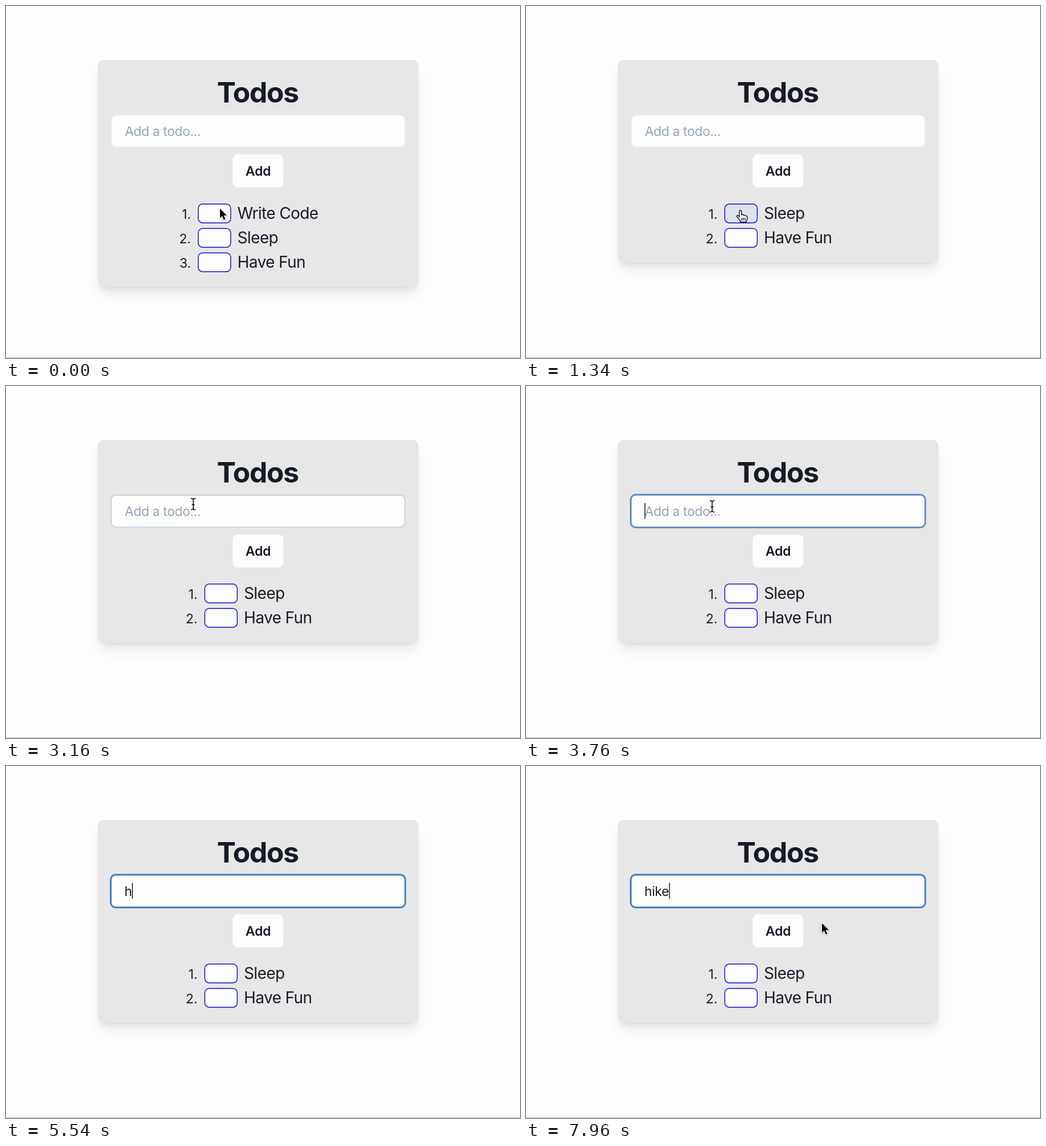
An HTML page with a canvas that plays this animation: 903 px wide and 620 px high, repeating every 8000 ms.

```html
<!DOCTYPE html>
<html lang="en">
<head>
<meta charset="utf-8">
<title>Todos</title>
<style>
  html, body { margin: 0; width: 100%; height: 100%; overflow: hidden; background: #fdfdfd; }
  canvas { display: block; width: 903px; height: 620px; }
</style>
</head>
<body>
<canvas id="stage"></canvas>
<script>
const W = 903, H = 620, LOOP = 8000;
const canvas = document.getElementById('stage');
const ctx = canvas.getContext('2d');
const dpr = window.devicePixelRatio || 1;
canvas.width = W * dpr;
canvas.height = H * dpr;

const PAPER = [253, 253, 253], HOVER = [221, 226, 236];
const EDGE = [226, 232, 240], EDGE_HOVER = [184, 198, 208], FOCUS = [50, 112, 178];
const INK = '#161b26', CARD = '#e7e7e7', BLUE = '#0b0bd0';
const FONT = 'Inter, "Open Sans", sans-serif';

// Event times in ms
const REMOVE = 1090, LEAVE = 2210, ENTER = 2320, CLICK = 3620;
const BLINK = 560;
const KEYS = [[5420, 'h'], [5840, 'i'], [6420, 'k'], [6680, 'e']];
const REAPPEAR = 7300;

// Pointer path: time, x, y
const PATH = [
  [0, 376, 357], [300, 377, 360], [2080, 377, 360], [2300, 342, 232],
  [2420, 340, 229], [2640, 340, 229], [3120, 329, 208], [3380, 329, 208],
  [3560, 327, 212], [REAPPEAR, 327, 212], [7560, 440, 228],
  [7760, 512, 258], [7940, 520, 277], [LOOP, 520, 277]
];

const clamp = v => Math.max(0, Math.min(1, v));
const ease = v => { v = clamp(v); return v * v * (3 - 2 * v); };
const fade = (t, start, len = 200) => ease((t - start) / len);
const mix = (a, b, k) => `rgb(${a.map((v, i) => Math.round(v + (b[i] - v) * k))})`;

function roundRect(x, y, w, h, r) {
  ctx.beginPath();
  ctx.roundRect(x, y, w, h, r);
}

function fillBox(x, y, w, h, r, color) {
  roundRect(x, y, w, h, r);
  ctx.fillStyle = color;
  ctx.fill();
}

function strokeBox(x, y, w, h, r, color, line) {
  roundRect(x + line / 2, y + line / 2, w - line, h - line, r - line / 2);
  ctx.strokeStyle = color;
  ctx.lineWidth = line;
  ctx.stroke();
}

function text(str, x, y, size, { weight = 400, color = INK, align = 'left', track = 0 } = {}) {
  ctx.font = `${weight} ${size}px ${FONT}`;
  ctx.letterSpacing = track + 'px';
  ctx.textAlign = align;
  ctx.fillStyle = color;
  ctx.fillText(str, x, y);
}

function shadow(x, y, w, h, dy, blur, inset, alpha) {
  ctx.save();
  ctx.shadowColor = `rgba(0,0,0,${alpha})`;
  ctx.shadowBlur = blur * dpr;
  ctx.shadowOffsetY = dy * dpr;
  fillBox(x + inset, y + inset, w - 2 * inset, h - 2 * inset, 8, CARD);
  ctx.restore();
}

function drawCard(height) {
  const box = [161, 95, 563.5, height];
  shadow(...box, 14.4, 21.6, 4.3, 0.1);
  shadow(...box, 5.8, 8.6, 2.9, 0.05);
  fillBox(...box, 10, CARD);
}

function drawInput(t) {
  const x = 184, y = 191.5, w = 517.5, h = 57.6;
  const focus = fade(t, CLICK);
  const edge = mix(EDGE, EDGE_HOVER, fade(t, ENTER));
  if (focus > 0) {
    ctx.globalAlpha = focus;
    strokeBox(x - 1.4, y - 1.4, w + 2.8, h + 2.8, 10, mix(FOCUS, FOCUS, 0), 2);
    ctx.globalAlpha = 1;
  }
  fillBox(x, y, w, h, 8.6, mix(PAPER, PAPER, 0));
  const parts = edge.match(/\d+/g).map(Number);
  strokeBox(x, y, w, h, 8.6, mix(parts, FOCUS, focus), 1.44);

  const typed = KEYS.filter(k => t >= k[0]);
  const value = typed.map(k => k[1]).join('');
  const style = { track: -0.4 };
  if (value) text(value, 208, 229, 23, style);
  else text('Add a todo...', 208.5, 229, 23, { ...style, color: '#98a5b8' });

  if (t < CLICK + 40) return;
  const since = t - (typed.length ? typed[typed.length - 1][0] : CLICK);
  if (Math.floor(since / BLINK) % 2) return;
  const end = value ? ctx.measureText(value).width : 0;
  ctx.fillStyle = INK;
  ctx.fillRect(208.2 + end, 206, 1.5, 28);
}

function drawItem(label, row, shift, hover) {
  const y = 348 + row * 43;
  text(`${row + 1}.`, 325 + shift, y + 27, 23, { align: 'right' });
  fillBox(337 + shift, y, 58.5, 34.8, 8.6, mix(PAPER, HOVER, hover));
  strokeBox(337 + shift, y, 58.5, 34.8, 8.6, BLUE, 1.44);
  text(label, 406.5 + shift, y + 27, 28, { track: -0.6 });
}

function shape(points) {
  ctx.beginPath();
  points.forEach(([x, y]) => ctx.lineTo(x, y));
  ctx.closePath();
}

function drawArrow() {
  shape([[0, 0], [0, 16.6], [3.8, 13], [6.6, 19.6], [9.4, 18.4], [6.6, 12], [11.8, 11.8]]);
  ctx.shadowColor = 'rgba(0,0,0,.3)';
  ctx.shadowBlur = 3 * dpr;
  ctx.shadowOffsetY = dpr;
  ctx.strokeStyle = '#fff';
  ctx.lineWidth = 2;
  ctx.stroke();
  ctx.shadowColor = 'transparent';
  ctx.fillStyle = '#000';
  ctx.fill();
}

function drawHand() {
  const outline = new Path2D('M-2.2 12V1.6Q-2 0 -.4 0Q1.4 0 1.6 1.6V8Q4.5 6.4 5.2 8.7' +
    'Q8 7.5 8.6 9.8Q11.6 9 11.6 12V15Q11.4 17 9.8 18.4V20.5H0V18.4' +
    'Q-2.5 16.3 -4 13.5L-6.4 11.2Q-7.2 9.5 -5.6 8.9Q-4.4 8.7 -2.2 11Z');
  ctx.shadowColor = 'rgba(0,0,0,.25)';
  ctx.shadowBlur = 2 * dpr;
  ctx.shadowOffsetY = dpr;
  ctx.fillStyle = '#fff';
  ctx.fill(outline);
  ctx.shadowColor = 'transparent';
  ctx.strokeStyle = '#000';
  ctx.lineWidth = 1.3;
  ctx.stroke(outline);
  ctx.stroke(new Path2D('M2 13V17.5M4.9 13V17.5M7.8 13V17.5'));
}

function drawBeam() {
  const beam = new Path2D('M-4.3 -10Q0 -10 0 -7.5Q0 -10 4.3 -10M0 -8V8' +
    'M-4.3 10Q0 10 0 7.5Q0 10 4.3 10M-2.4 1H2.4');
  ctx.strokeStyle = 'rgba(255,255,255,.8)';
  ctx.lineWidth = 3;
  ctx.stroke(beam);
  ctx.strokeStyle = '#000';
  ctx.lineWidth = 1.5;
  ctx.stroke(beam);
}

function pointerAt(t) {
  const i = Math.max(1, PATH.findIndex(p => p[0] > t));
  const [t0, x0, y0] = PATH[i - 1], [t1, x1, y1] = PATH[i];
  const k = ease((t - t0) / (t1 - t0));
  return [x0 + (x1 - x0) * k, y0 + (y1 - y0) * k];
}

function drawPointer(t) {
  if (t >= KEYS[0][0] && t < REAPPEAR) return;
  const [x, y] = pointerAt(t);
  const overInput = y > 191 && y < 249;
  const overBox = t > 80 && y > 348;
  ctx.save();
  ctx.translate(x, y);
  ctx.lineJoin = 'round';
  if (overInput) drawBeam();
  else if (overBox) drawHand();
  else drawArrow();
  ctx.restore();
}

function draw(t) {
  ctx.setTransform(dpr, 0, 0, dpr, 0, 0);
  ctx.fillStyle = '#fdfdfd';
  ctx.fillRect(0, 0, W, H);
  ctx.fillStyle = '#b9b9b9';
  ctx.fillRect(0, 619, W, 1);

  const removed = t >= REMOVE;
  const items = removed ? ['Sleep', 'Have Fun'] : ['Write Code', 'Sleep', 'Have Fun'];
  const hover = removed ? fade(t, REMOVE) - fade(t, LEAVE) : fade(t, 60);

  drawCard(271 + items.length * 43);
  text('Todos', 442, 170, 50, { weight: 700, align: 'center', track: -1.5 });
  drawInput(t);
  fillBox(398, 261.5, 89.5, 58, 8.6, '#fdfdfd');
  text('Add', 443, 299, 23, { weight: 600, align: 'center', track: -0.2 });
  ctx.fillStyle = '#e2e4e8';
  ctx.fillRect(184, 330.5, 517.5, 1);
  items.forEach((label, i) => drawItem(label, i, removed ? 11.5 : 0, i ? 0 : hover));
  drawPointer(t);
}

const start = performance.now();
function tick() {
  draw((performance.now() - start) % LOOP);
  requestAnimationFrame(tick);
}
tick();
</script>
</body>
</html>
```
